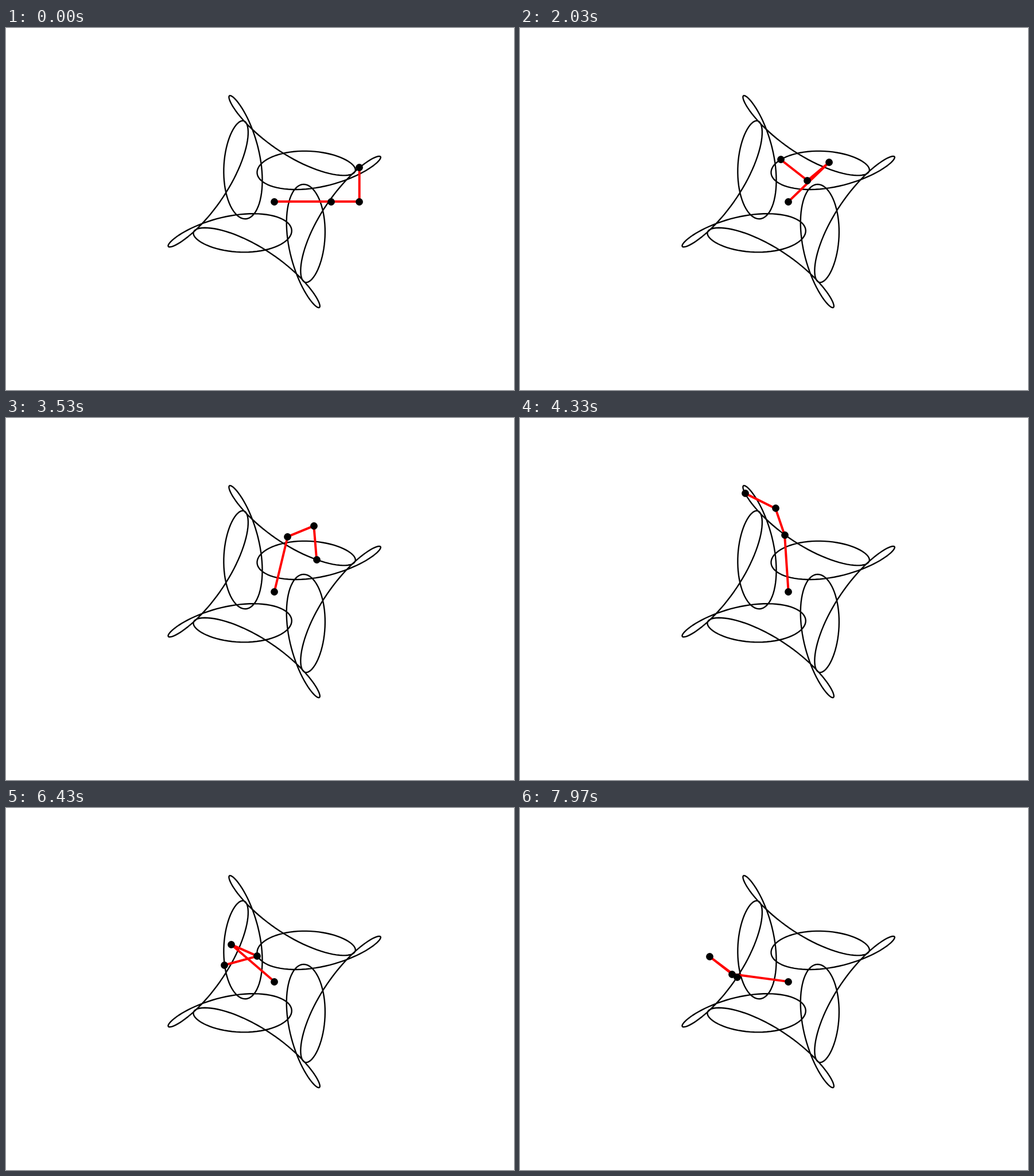
These frames come from a looping animation (885 by 632 pixels, 8 s). An HTML page with a canvas:

```html
<!DOCTYPE html>
<html lang="en">
<head>
<meta charset="utf-8">
<title>Epicycle curve</title>
<style>
  html, body { margin: 0; width: 100%; height: 100%; overflow: hidden; background: #fff; }
  canvas { display: block; }
</style>
</head>
<body>
<canvas id="stage" width="885" height="632"></canvas>
<script>
const ctx = document.getElementById('stage').getContext('2d');
const LOOP = 8000;
const FRAMES = 240;
const SAMPLES = 500;
const STEP = 2 * Math.PI / (SAMPLES - 1);
const CENTER = [467.6, 303.1];
const UNIT = 98.7;

// Each arm: length, turns per cycle, starting angle.
const ARMS = [
  [1, 1, 0],
  [0.5, 5, 0],
  [0.6, -7, Math.PI / 2]
];

// Joints from the fixed pivot to the pen tip; y points up.
function joints(angle) {
  let [x, y] = CENTER;
  const points = [[x, y]];
  for (const [length, turns, phase] of ARMS) {
    x += UNIT * length * Math.cos(turns * angle + phase);
    y -= UNIT * length * Math.sin(turns * angle + phase);
    points.push([x, y]);
  }
  return points;
}

function polyline(points, color, width) {
  ctx.beginPath();
  for (const [x, y] of points) ctx.lineTo(x, y);
  ctx.strokeStyle = color;
  ctx.lineWidth = width;
  ctx.stroke();
}

function dot([x, y]) {
  ctx.beginPath();
  ctx.arc(Math.floor(x) + 0.5, Math.floor(y) + 0.5, 6.4, 0, 2 * Math.PI);
  ctx.fill();
}

const curve = Array.from({ length: SAMPLES }, (_, i) => joints(i * STEP)[ARMS.length]);

// 30 poses per second, switching on 10 ms ticks.
function poseAt(ms) {
  const tick = Math.floor((ms % LOOP) / 10) * 10;
  return Math.min(FRAMES - 1, Math.floor((tick + 5) * 0.03));
}

function draw() {
  const arm = joints(poseAt(performance.now()) * STEP);
  ctx.fillStyle = '#fff';
  ctx.fillRect(0, 0, 885, 632);
  ctx.lineJoin = 'round';
  ctx.lineCap = 'square';
  polyline(curve, '#000', 2.4);
  polyline(arm, '#f00', 4);
  ctx.fillStyle = '#000';
  arm.forEach(dot);
  requestAnimationFrame(draw);
}

draw();
</script>
</body>
</html>
```
